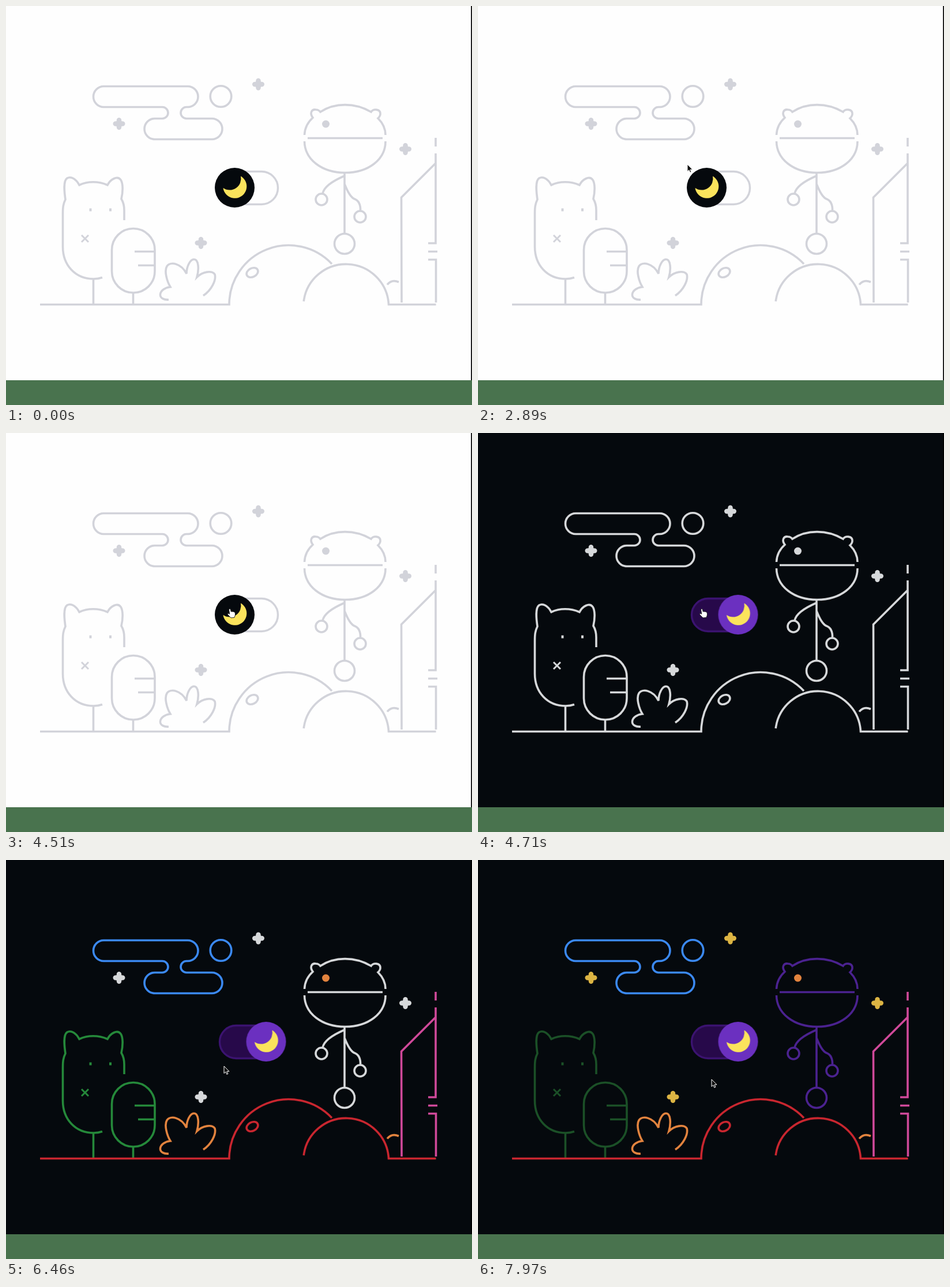
An HTML page without scripts that plays this animation: 808x693 px, repeating every 8000 ms.

```html
<!DOCTYPE html>
<html lang="en">
<head>
<meta charset="utf-8">
<title>Night switch</title>
<style>
  html, body { margin: 0; width: 100%; height: 100%; overflow: hidden; background: #49734e; }
  svg { display: block; width: 808px; height: 693px; }
  svg * { animation-duration: 8s; animation-iteration-count: infinite; animation-timing-function: linear; }

  .sky { animation-name: sky; animation-timing-function: step-end; }
  .line { fill: none; stroke: currentColor; stroke-width: 3.6; }
  .tint { animation-name: tint; }
  .clouds { --c: #3b89f2; --d: #3b89f2; }
  .trees { --c: #25893a; --d: #1b5027; }
  .bush { --c: #e2833e; --d: #e2833e; }
  .ground { --c: #c9262f; --d: #c9262f; }
  .tower { --c: #d0499a; --d: #d0499a; }
  .robot { --c: #d6d8da; --d: #4b2290; }
  .stars { --c: #d6d8da; --d: #dcb443; }

  .track { animation-name: track; animation-timing-function: step-end; stroke-width: 3.4; }
  .knob { animation-name: knob; animation-timing-function: step-end; }
  .cursor { animation-name: roam; }
  .arrow { animation-name: arrow; animation-timing-function: step-end; }
  .hand { animation-name: hand; animation-timing-function: step-end; }

  @keyframes sky { 0% { fill: #fefefe; } 58.875%, 100% { fill: #05090d; } }
  @keyframes tint {
    0%, 58.87% { color: #d2d3da; }
    58.875%, 68.8% { color: #d6d8da; }
    80%, 80.75% { color: var(--c); }
    98%, 100% { color: var(--d); }
  }
  @keyframes track {
    0% { fill: #fefefe; stroke: #d2d3da; }
    58.875%, 100% { fill: #27094a; stroke: #3b1370; }
  }
  @keyframes knob {
    0% { transform: none; fill: #05090d; }
    58.875%, 100% { transform: translateX(54.5px); fill: #6b30c0; }
  }
  @keyframes roam {
    0%, 8.25% { transform: translate(300px, 498px); }
    18.5% { transform: translate(333px, 455px); }
    24.1%, 25.3% { transform: translate(373px, 331px); }
    28.7% { transform: translate(379px, 320px); }
    33% { transform: translate(350px, 292px); }
    36.1%, 37.2% { transform: translate(363px, 275px); }
    39.6% { transform: translate(343px, 272px); }
    44% { transform: translate(328px, 300px); }
    49% { transform: translate(362px, 324px); }
    52.6%, 56.3% { transform: translate(380px, 304px); }
    56.375%, 61.5% { transform: translate(388px, 305px); }
    63.75%, 68.8% { transform: translate(398px, 304px); }
    73% { transform: translate(386px, 340px); }
    78.6%, 82% { transform: translate(378px, 358px); }
    90% { transform: translate(395px, 373px); }
    98%, 100% { transform: translate(405px, 381px); }
  }
  @keyframes arrow {
    0% { opacity: 0; } 8.25% { opacity: 1; }
    22.8% { opacity: 0; } 30.5% { opacity: 1; }
    48.5% { opacity: 0; } 73%, 100% { opacity: 1; }
  }
  @keyframes hand {
    0% { opacity: 0; } 22.8% { opacity: 1; }
    30.5% { opacity: 0; } 48.5% { opacity: 1; }
    73%, 100% { opacity: 0; }
  }
</style>
</head>
<body>
<svg viewBox="0 0 808 693">
  <defs>
    <g id="star" fill="currentColor">
      <path d="M-9 0L0-9L9 0L0 9Z"/>
      <path d="M-6.3 0H6.3M0-6.3V6.3" stroke="currentColor" stroke-width="8.4" stroke-linecap="round"/>
    </g>
  </defs>

  <rect width="808" height="650"/>
  <rect class="sky" width="806.3" height="650"/>
  <rect y="650" width="808" height="43" fill="#49734e"/>

  <g class="line tint clouds">
    <path d="M169.500 139.500H315a18 18 0 0 1 0 36H313a10 10 0 0 0 0 20H357a18 18 0 0 1 0 36H258a18 18 0 0 1 0-36H271a10 10 0 0 0 0-20H169.500a18 18 0 0 1 0-36Z"/>
    <circle cx="372.500" cy="157" r="18.300"/>
  </g>

  <g class="tint stars">
    <use href="#star" x="437.500" y="136"/>
    <use href="#star" x="196" y="204.500"/>
    <use href="#star" x="692.500" y="248.500"/>
    <use href="#star" x="338" y="411.500"/>
  </g>

  <g class="line tint trees">
    <path d="M205 372V355C205 346 203 340 200 335C203 322 203 308 199 302C193 294 181 301 176 311C160 304 142 304 127 311C122 301 113 295 106 299C99 304 101 322 103 336C99 344 98.500 350 98.500 362V418C98.500 450 120 474 152 474Q160 474 167 471.500M151.500 474V518"/>
    <path d="M146.500 351.500V356.500M181 351.500V356.500" stroke-width="4"/>
    <path d="M131 398L143 410M143 398L131 410" stroke-width="3"/>
    <rect x="183.500" y="386.500" width="74.500" height="111.500" rx="37.200"/>
    <path d="M223 426.500H258M229 450.500H258M220.500 498V518"/>
  </g>

  <g class="line tint bush">
    <path d="M282 510C274 511 267 507 267.500 501C268 494 276 489 285 488C279 478 274 460 279 452C285 443 304 447 313 465C313 453 319 440 326 440C334 440 335 457 331 471C341 461 357 459 362 466C365 476 356 494 342 503"/>
    <path d="M661 484Q669 474 681 479.500"/>
  </g>

  <g class="line tint ground">
    <path d="M59 518.500H387A103 103 0 0 1 565 448M516.200 513A74 74 0 0 1 663.500 518.500H745.500"/>
    <ellipse cx="427" cy="463" rx="10.500" ry="7.500" transform="rotate(-28 427 463)"/>
  </g>

  <g class="line tint tower">
    <path d="M745 229V244M732 412H745V256M745 273L685.500 332.500L686 515M732 426.500H748M732 440.500H745.500V515"/>
  </g>

  <g class="line tint robot">
    <path d="M517.500 224C518 212 523 202 532 194C526 186 530 179 537 180Q542 180 545 184C570 167.500 605 167.500 633 184C637 178 648 179 649 186Q649.500 191 645 195C653 203 658 213 658 224"/>
    <path d="M523 229.500H653M517.500 235C518 267 548 289.500 588 289.500S658 267 658 235"/>
    <path d="M587 290V395M587 295C566 304 551 314 549 326M587 309C592 322 597 332 604 335C612 338 615 345 614.500 356"/>
    <circle cx="587" cy="413" r="17.500"/>
    <circle cx="547" cy="336" r="10"/>
    <circle cx="614" cy="366" r="10"/>
  </g>
  <g class="tint bush">
    <circle cx="554.500" cy="205" r="6.500" fill="currentColor"/>
  </g>

  <rect class="track" x="370.500" y="287.500" width="101" height="57" rx="28.500"/>
  <g class="knob">
    <circle cx="396.500" cy="315.500" r="34.500"/>
    <path fill="#fbe35c" d="M407 295.500A20.500 20.500 0 1 1 376.500 316A19.700 19.700 0 0 0 407 295.500Z"/>
  </g>

  <g class="cursor">
    <path class="arrow" fill="#111" stroke="#fff" d="M0 0V12.500L2.900 9.900L4.800 14.300L6.900 13.400L5 9.200H9Z"/>
    <path class="hand" fill="#fff" stroke="#111" stroke-width=".9" d="M-1.500 1.500Q0-.8 1.300 1.500L2.300 5.500Q4 4 5 5.500Q6.700 4.500 7.300 6Q9 5.600 9.200 7.500L9.500 11L8 15.500L2 16L-3.800 10Q-4 7.500-1.500 8.700L-.3 9.500Z"/>
  </g>
</svg>
</body>
</html>
```
